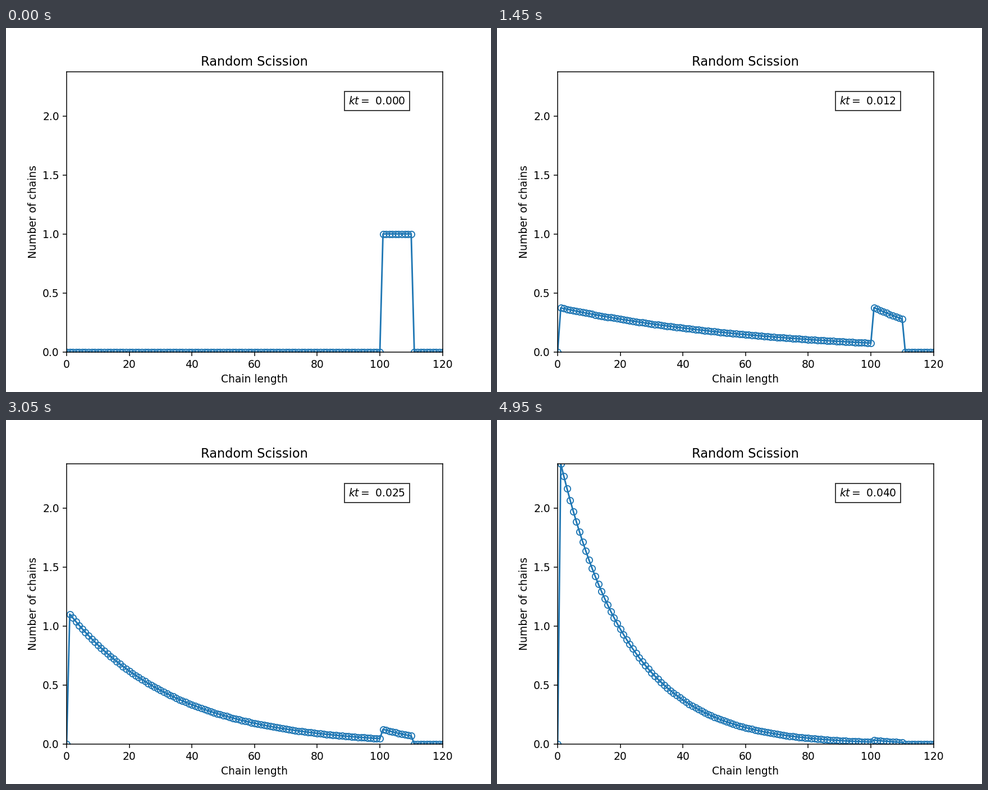
A matplotlib script for the animation above (5 s loop, 864 by 648 pixels).

```python
import numpy as np
import matplotlib.pyplot as plt
from matplotlib.animation import FuncAnimation

FRAMES = 100
INTERVAL = 50
KT_MAX = 0.04
START_LENGTHS = range(101, 111)

lengths = np.arange(121)
times = np.linspace(0, KT_MAX, FRAMES)


def chain_counts(kt):
    """Exact random-scission distribution for one chain of each start length."""
    cut = 1 - np.exp(-kt)
    intact = np.exp(-kt * (lengths - 1))
    counts = np.zeros(len(lengths))
    for start in START_LENGTHS:
        shorter = (lengths >= 1) & (lengths < start)
        pieces = 2 * cut + (start - lengths - 1) * cut**2
        counts += np.where(shorter, intact * pieces, 0)
        counts[start] += intact[start]
    return counts


fig, ax = plt.subplots(figsize=(6.4, 4.8), dpi=135)
ax.set_xlim(0, 120)
ax.set_ylim(0, chain_counts(KT_MAX).max())
ax.set_title("Random Scission")
ax.set_xlabel("Chain length")
ax.set_ylabel("Number of chains")

line, = ax.plot(lengths, chain_counts(0), "-o", color="C0", mfc="none")
label = ax.text(90, 2.1, "", bbox=dict(facecolor="white", alpha=0.8))


def update(frame):
    kt = times[frame]
    line.set_ydata(chain_counts(kt))
    label.set_text(f"$kt=$ {kt:.3f}")
    return line, label


anim = FuncAnimation(fig, update, frames=FRAMES, interval=INTERVAL,
                     repeat=True, repeat_delay=0)
plt.show()
```
